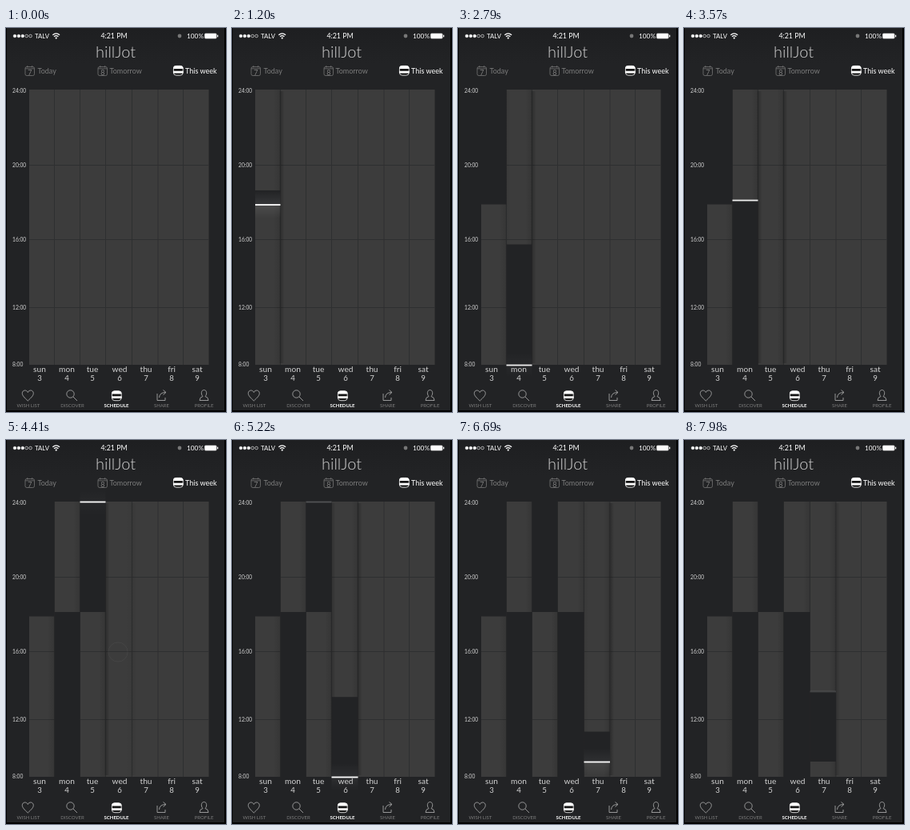
Write an HTML page that moves like this. It is 275x480 px and loops after 8 s.

```html
<!DOCTYPE html>
<html lang="en">
<head>
<meta charset="utf-8">
<title>Weekly schedule</title>
<style>
  html, body { margin: 0; width: 100%; height: 100%; overflow: hidden; background: #000; }
  svg { display: block; width: 100%; height: 100%; }
  text { font-family: Lato, "Open Sans", sans-serif; fill: #d2d2d2; }
  .mid { text-anchor: middle; }
  .bright { fill: #fff; }
  .muted { fill: #7c7c7c; }
  .line { fill: none; stroke: #b4b4b4; stroke-width: .8; }
  .dim { fill: none; stroke: #747474; stroke-width: .8; }
</style>
</head>
<body>
<svg viewBox="0 0 275 480">
  <defs>
    <linearGradient id="header" x2="0" y2="1">
      <stop stop-color="#1e1f21"/><stop offset="1" stop-color="#222325"/>
    </linearGradient>
    <linearGradient id="glow" x2="0" y2="1">
      <stop stop-color="#fff" stop-opacity="0"/>
      <stop offset=".5" stop-color="#fff" stop-opacity=".1"/>
      <stop offset="1" stop-color="#fff" stop-opacity="0"/>
    </linearGradient>
    <linearGradient id="shadow">
      <stop stop-opacity="0"/>
      <stop offset=".45" stop-opacity=".2"/>
      <stop offset="1" stop-opacity="0"/>
    </linearGradient>
    <linearGradient id="crease">
      <stop stop-opacity="0"/><stop offset="1" stop-opacity=".12"/>
    </linearGradient>
    <g id="stripes">
      <rect x=".4" y=".4" width="11.8" height="11.8" rx="3.5" fill="#151515" stroke="#fff" stroke-width=".8"/>
      <path d="M0 4V3.5Q0 0 3.5 0H9Q12.6 0 12.6 3.5V4ZM0 6.8H12.6V9.6H0Z" fill="#fff"/>
    </g>
    <g id="calendar" class="dim">
      <rect x=".5" y="1.5" width="11.5" height="11" rx="2"/>
      <path d="M.5 3.8H12M3.3 0V2.5M9.2 0V2.5"/>
    </g>
  </defs>

  <rect x="1" width="272" height="478" fill="#222325"/>
  <rect x="1" width="272" height="44" fill="url(#header)"/>

  <g id="signal" stroke="#fff" stroke-width=".6"></g>
  <text class="bright" x="36" y="13" font-size="7.8">TALV</text>
  <path d="M58.3 8.8Q62.7 5 67.1 8.8M60 10.8Q62.7 8.4 65.4 10.8" fill="none" stroke="#fff" stroke-width="1.3"/>
  <circle cx="62.7" cy="12.6" r="1.1" fill="#fff"/>
  <text class="mid bright" x="135" y="13" font-size="8.8">4:21 PM</text>
  <circle cx="217" cy="10" r="2.4" fill="#777"/>
  <text class="bright" x="226" y="13" font-size="8.3">100%</text>
  <rect x="248.5" y="7" width="14.5" height="6" rx="1" fill="#fff" stroke="#fff" stroke-width=".6"/>
  <rect x="264" y="8.7" width="1.2" height="2.6" fill="#fff"/>

  <text class="mid" x="137" y="37" font-size="20" font-weight="300">hillJot</text>

  <g font-size="9">
    <use href="#calendar" x="23.5" y="47"/>
    <use href="#calendar" x="114.5" y="47"/>
    <text class="mid muted" x="29.8" y="58.5">7</text>
    <text class="mid muted" x="120.8" y="58.5">8</text>
    <text class="muted" x="39.5" y="57">Today</text>
    <text class="muted" x="129.5" y="57">Tomorrow</text>
    <use href="#stripes" x="209" y="47"/>
    <text class="bright" x="224" y="57">This week</text>
  </g>

  <g id="board"></g>
  <g id="labels"></g>

  <path class="line" d="M27.3 466C23 462 20.3 459.5 20.3 456.6C20.3 452.4 25.8 451.7 27.3 455.5C28.8 451.7 34.3 452.4 34.3 456.6C34.3 459.5 31.6 462 27.3 466Z"/>
  <circle class="line" cx="80.5" cy="457.5" r="4.7"/>
  <path class="line" d="M84 461L89 466"/>
  <use href="#stripes" x="132" y="453.5"/>
  <path class="line" d="M189 457V465.5H199V462M191.5 462Q192 455.5 199.5 455.5M196.5 452.5L200 455.5L196.5 458.5"/>
  <path class="line" d="M242 465.5Q242 461.5 246 460.5C243.5 458 243.7 452.5 247.5 452.5S251.5 458 249 460.5Q253 461.5 253 465.5Z"/>
</svg>
<script>
const NS = "http://www.w3.org/2000/svg";
const LOOP = 8000, TOP = 77, BOTTOM = 421;
const BACKGROUND = "#222325", PANEL = "#3c3c3c", GRID = "#2e2f30";
const edges = [29, 60.5, 92.5, 124.5, 157.5, 190, 221.5, 253.5];
const rows = [171.5, 264.5, 349.5];

// Each drag clears a slot upwards, from y "from" to y "to".
const drags = [
  { start: 1110, from: 220.5, to: TOP, tapY: 265 },
  { start: 2530, from: BOTTOM, to: 215, tapY: 265 },
  { start: 3790, from: 215, to: TOP, tapY: 265 },
  { start: 5025, from: BOTTOM, to: 215, tapY: 265 },
  { start: 6510, from: 402, to: 314, tapY: 187 }
];

const find = id => document.getElementById(id);
function add(parent, tag, attrs = {}, text = "") {
  const node = document.createElementNS(NS, tag);
  for (const key in attrs) node.setAttribute(key, attrs[key]);
  node.textContent = text;
  parent.append(node);
  return node;
}
const rect = (parent, x, y, width, height, fill) =>
  add(parent, "rect", { x, y, width, height, fill });
const label = (text, x, y, size, cls = "mid") =>
  add(find("labels"), "text", { x, y, "font-size": size, class: cls }, text);

for (let i = 0; i < 5; i++)
  add(find("signal"), "circle", { cx: 11 + i * 4.9, cy: 10, r: 1.8, fill: i < 3 ? "#fff" : "none" });

const board = find("board");
rect(board, 29, TOP, 224.5, BOTTOM - TOP, PANEL);
rows.forEach(y => rect(board, 29, y - .5, 224.5, 1, GRID));
edges.slice(1, -1).forEach(x => rect(board, x - .5, TOP, 1, BOTTOM - TOP, GRID));

[TOP, ...rows, BOTTOM].forEach((y, i) =>
  label(`${24 - i * 4}:00`, 8, y + (i ? 2.3 : 4.2), 6.7, ""));
["sun", "mon", "tue", "wed", "thu", "fri", "sat"].forEach((day, i) => {
  const x = [42, 76, 108, 142, 175, 207, 239][i];
  label(day, x, 430, 10.2);
  label(i + 3, x, 441, 9.7);
});
["WISH LIST", "DISCOVER", "SCHEDULE", "SHARE", "PROFILE"].forEach((name, i) =>
  label(name, [28, 83, 138, 194.5, 247.5][i], 474, 6, i === 2 ? "mid bright" : "mid muted"))
find("labels").querySelector(".bright").setAttribute("font-weight", 700);

function marker(x, width, y) {
  const group = add(board, "g");
  const glow = rect(group, x, y - 17, width, 34, "url(#glow)");
  rect(group, x, y - .4, width, 1.8, "#fff");
  return { group, glow };
}
const columns = drags.map((drag, i) => {
  const x = edges[i], width = edges[i + 1] - x, height = BOTTOM - TOP;
  return {
    ...drag, x, width,
    shade: rect(board, x + width - 2, TOP + 2, 7, height - 4, "url(#shadow)"),
    crease: rect(board, x + width - 8, TOP, 8, height, "url(#crease)")
  };
});
for (const c of columns) c.slot = rect(board, c.x, c.from, c.width, 0, BACKGROUND);
for (const c of columns) {
  c.first = marker(c.x, c.width, c.from);
  c.last = marker(c.x, c.width, c.to);
  c.tap = add(board, "circle", { cx: c.x + 15.5, cy: c.tapY, fill: "none", stroke: "#777", "stroke-width": .8 });
}

const ramp = (t, a, b) => Math.min(1, Math.max(0, (t - a) / (b - a)));
const ease = p => (1 - Math.cos(Math.PI * p)) / 2;
const pulse = (t, a, b, c, d) => ramp(t, a, b) * (1 - ramp(t, c, d));
const fade = (node, opacity) => node.setAttribute("opacity", opacity);

function draw(now) {
  const time = now % LOOP;
  for (const c of columns) {
    const t = time - c.start;
    const height = (c.from - c.to) * ease(ramp(t, 0, 400));
    c.slot.setAttribute("y", c.from - height);
    c.slot.setAttribute("height", height);
    fade(c.shade, pulse(t, -690, -450, 1300, 1800));
    fade(c.crease, ramp(t, -690, -450));
    fade(c.first.group, pulse(t, -95, 20, 250, 400));
    fade(c.first.glow, 1 - ramp(t, 60, 350));
    fade(c.last.group, pulse(t, 350, 430, 1000, 1550));
    fade(c.last.glow, 1 - ramp(t, 430, 680));
    fade(c.tap, .3 * pulse(t, -690, -570, -480, -350));
    c.tap.setAttribute("r", 10 + 6 * ease(ramp(t, -690, -500)));
  }
  requestAnimationFrame(draw);
}
draw(0);
</script>
</body>
</html>
```
